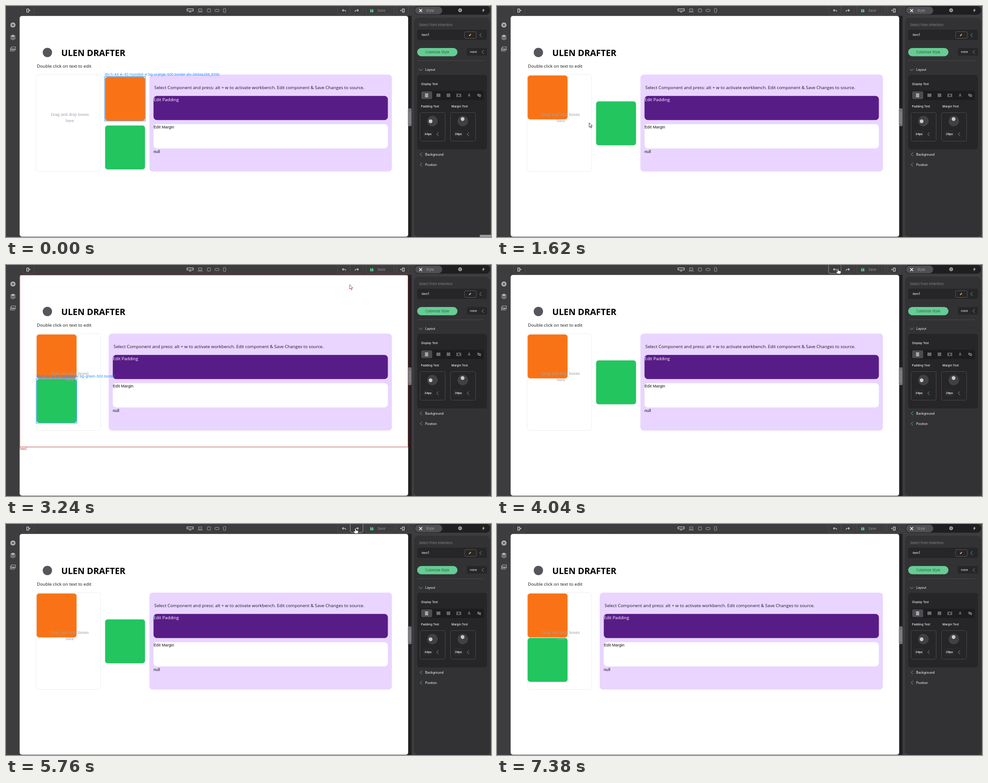
Animation, 1084 px wide and 517 px high, one loop 7680 ms. Source, as an HTML page:

```html
<!DOCTYPE html>
<html lang="en">
<head>
<meta charset="utf-8">
<title>Page builder: drag, undo, redo</title>
<style>
html, body { margin: 0; width: 100%; height: 100%; overflow: hidden; background: #3d3d3f; }
svg { display: block; width: 1084px; height: 517px; }
text { white-space: pre; }
.ui { font-family: Inter, sans-serif; }
.page { font-family: "Open Sans", "Noto Sans", sans-serif; }
.plain { font-family: "Liberation Sans", Arial, sans-serif; }
</style>
</head>
<body>
<svg id="stage" viewBox="0 0 1084 517"></svg>
<script>
const LOOP = 7680;
const ORANGE = '#f97316', GREEN = '#22c55e', BLUE = '#1e90ff', MINT = '#66cc94', RED = '#b5282c';

// Markup helpers
const rect = (x, y, w, h, r, fill, extra = '') =>
  `<rect x="${x}" y="${y}" width="${w}" height="${h}" rx="${r}" fill="${fill}" ${extra}/>`;
const frame = (x, y, w, h, r, color, extra = '') => rect(x, y, w, h, r, 'none', `stroke="${color}" ${extra}`);
const line = (d, color, width = 1) =>
  `<path d="${d}" fill="none" stroke="${color}" stroke-width="${width}" stroke-linejoin="round"/>`;
const shape = (d, fill) => `<path d="${d}" fill="${fill}"/>`;
const circle = (x, y, r, fill) => `<circle cx="${x}" cy="${y}" r="${r}" fill="${fill}"/>`;
const text = (x, y, str, size, fill, font = 'ui', extra = '') =>
  `<text x="${x}" y="${y}" font-size="${size}" fill="${fill}" class="${font}" ${extra}>${str}</text>`;
const group = (id, body) => `<g id="${id}">${body}</g>`;
const chevron = (x, y) => line(`M${x + 2} ${y - 4}l-4.5 4l4.5 4`, MINT, .85);
const box = (fill) => rect(.3, .3, 89.6, 98.6, 6, fill, 'stroke="#e5e7eb" stroke-width=".5"');
const outline = (label, color = BLUE) =>
  frame(-.4, -.4, 90.8, 99.8, 0, color) + text(0, -2.2, label, 7.72, color);
const ghost = (fill) => `<g opacity=".75">${box(fill)}${line('M0 99V0H90', '#5f9fd8', .7)}</g>`;

function toolbar() {
  const button = (x, w, id = '') => frame(x + .5, -4.5, w, 23.5, 4, '#4c4c4f', id && `id="${id}"`);
  const undoArrow = 'M752 9.8H757q2.3 0 2.3 3M754.3 7.3l-2.4 2.5l2.4 2.5';
  return button(36.5, 26) + line('M46.5 6.5h4v7.5h-4z', '#eee', 1.2) + shape('M52 8.2l2.7 1.8l-2.7 1.8z', '#eee') +
    line('M404.5 6.5h14v4.5h-14zM409 13.5h5', '#eee', 1.1) +
    line('M430.5 6.5h7v5h-7zM428.5 13.5h11', '#aaa') +
    frame(450, 6.5, 7, 7, 1, '#aaa') + frame(467, 7.5, 9, 5, 1.5, '#aaa') + frame(486, 5.5, 5, 9, 1.5, '#aaa') +
    button(740.5, 28, 'undo') + button(769, 28.5, 'redo') + line(undoArrow, '#eee', 1.1) +
    `<g transform="matrix(-1 0 0 1 1539.5 0)">${line(undoArrow, '#eee', 1.1)}</g>` +
    button(804, 63) + shape('M814 7h5.5l1.5 1.5v5.5h-7z', MINT) + rect(815.5, 7.5, 3, 2, 0, '#29472f') +
    circle(817.5, 12, 1.1, '#29472f') + text(830, 13, 'Save', 7.6, '#929295') +
    button(872.5, 27) + line('M886 6.5h4v7.5h-4z', '#eee', 1.2) + shape('M881.8 8.2l2.7 1.8l-2.7 1.8z', '#eee');
}

function leftRail() {
  const c = '#b2b2b4';
  return circle(15.5, 42.5, 5.7, c) + line('M12.5 42.5h6M15.5 39.5v6', '#3d3d3f', 1.3) +
    shape('M15.5 64l6 3.2l-6 3.2l-6-3.2z', c) + line('M9.8 70l5.7 3l5.7-3M9.8 72.8l5.7 3l5.7-3', c, 1.2) +
    line('M12 91.5h9v7h-9zM10 93.5v7.5h9.5', c, 1.2) + shape('M13 97.5l2.2-3l1.7 1.8l1.3-1.3l2 2.5z', c);
}

function dialCard(x, ballX, ballY, title, value) {
  return text(x + 2.5, 226.6, title, 6.5, '#eee', 'ui', 'font-weight="500"') +
    frame(x + .5, 238.5, 56, 64, 3, '#4a4a4c') + circle(x + 28, 257.5, 11.8, '#414143') +
    circle(ballX, ballY, 4.2, '#c9c9c9') + frame(x + 8.5, 279.5, 19, 13.5, 2, '#343436') +
    text(x + 10, 289, value, 6.6, '#fff', 'ui', 'font-weight="500"') + chevron(x + 40, 287);
}

function sidePanel() {
  const bars = [0, 3, 6].map(d => `M${963.5 + d} 196v7.5`).join('');
  const grid = [986, 988.8, 991.6].map(x => `M${x} 196v7.5`).join('') + 'M985 197h8M985 199.8h8M985 202.6h8';
  return rect(899, 22, 7.5, 495, 0, '#202022') + rect(898.5, 229, 8, 40, 3, '#707075') +
    [...Array(9)].map((_, i) => line(`M900 ${238 + i * 3}h5`, '#b4b4b8', .6)).join('') +
    rect(913, 0, 169, 19.5, 9.5, '#1f1f21') + rect(914, 1.5, 61, 17, 8.5, '#505054') +
    line('M923.5 7l6.5 6.5M930 7l-6.5 6.5', '#fff', 1.5) + text(939, 13, 'Style', 7.5, '#a3a3a6') +
    circle(1015, 9.5, 4.3, '#a2a2a4') + circle(1015, 9.5, 2, '#68686a') +
    shape('M1068 5l-4 5.5h2.5l-1 4l4.5-6h-2.7z', '#b4b4b6') +
    rect(912, 26, 170, 491, 10, '#323234') +
    text(923, 45.3, 'Select from inheritors', 7.4, '#858588') +
    rect(919, 53, 156, 23, 4, '#262628') + text(929, 67, 'item1', 6.9, '#fff') +
    frame(1025, 57.5, 26, 15, 3, '#5a5a5d') + line('M1035 67l4-4', '#f4ad59', 2) + chevron(1061, 65) +
    rect(919, 94, 90, 18.5, 9.2, MINT) + text(937, 106, 'Cutomize Style', 7.5, '#2b5740') +
    rect(1030, 94, 45, 17, 3, '#262628') + text(1037, 105, 'none', 6.6, '#fff') + chevron(1066, 103) +
    line('M919 122.5H1068', '#49494c') +
    line('M923 140.5l4 4.5l4-4.5', MINT, .85) + text(937, 145.2, 'Layout', 7, '#fff') +
    rect(919, 154, 156, 167, 6, '#262628') +
    text(928, 177.2, 'Display Test', 6.4, '#eee', 'ui', 'font-weight="500"') +
    rect(925, 189.5, 143, 21, 4, '#1d1d1f') + rect(928, 191, 24.5, 17.5, 3, '#4c4c51') +
    line('M936.5 197h7M936.5 200h7M936.5 203h7', '#fff', 1.7) + line(bars, '#aaa', 1.7) + line(grid, '#999') +
    line('M1009.5 197h5v6h-5zM1007.5 196v8M1016.5 196v8', '#999') + text(1032.3, 203.3, 'A', 8.5, '#aaa') +
    line('M1053.5 200q4-4.5 8 0q-4 4.5-8 0M1054 196l7 8', '#aaa', 1.1) +
    dialCard(925, 949, 258, 'Padding Test', '34px') + dialCard(993, 1020.5, 253, 'Margin Test', '39px') +
    chevron(928, 332) + text(937, 334.7, 'Background', 7.2, '#fff') +
    chevron(928, 355) + text(937, 357.5, 'Position', 6.9, '#fff');
}

function page() {
  const prompt = 'Select Component and press: alt + w to activate workbench. Edit component &amp; Save Changes to source.';
  const centred = 'text-anchor="middle"';
  return rect(30.5, 22.3, 868.3, 494, 5, '#fff') +
    circle(92.5, 104, 10.5, '#55555b') +
    text(123.5, 111.8, 'ULEN DRAFTER', 19.4, '#000', 'page', 'font-weight="700"') +
    text(69, 138, 'Double click on text to edit', 9.85, '#111', 'page') +
    frame(67.5, 153.5, 144, 217, 6, '#e3e5ea', 'stroke-dasharray="2 1"') +
    ['panel', 'inner', 'card'].map((id, i) =>
      rect(0, [153.5, 201.2, 264.5][i], 0, [217, 54, 54.3][i], 7.5, ['#e9d5ff', '#581c87', '#fff'][i], `id="${id}"`)).join('') +
    group('words', text(331.5, 185.7, prompt, 9.81, '#1c1522', 'page') + text(329.8, 213, 'Edit Padding', 9.7, '#fff', 'page') +
      text(329.8, 274.3, 'Edit Margin', 9.1, '#111', 'plain') + text(329.8, 328.5, 'null', 9.1, '#111', 'plain')) +
    group('orange', box(ORANGE)) + group('green', box(GREEN)) +
    text(142.7, 246, 'Drag and drop boxes', 9.1, '#9ca3af', 'plain', centred) +
    text(142.7, 259.5, 'here', 9.1, '#9ca3af', 'plain', centred) +
    group('orangeMark', outline('div.h-44 w-40 rounded-xl bg-orange-500 border div-084ea268_935b')) +
    group('greenMark', outline('div.h-44 w-40 rounded-xl bg-green-500 border')) +
    group('htmlMark', line('M30.9 407.3V22.6H898.5V407.3Z', RED, .9) + text(31, 414.3, 'html.', 7.2, RED)) +
    group('dropZone', frame(67, 153.5, 145, 217, 0, '#2fe78d', 'stroke-width="1.5"')) +
    group('insert', line('M97 0h91', '#3a9bf0')) +
    group('orangeGhost', ghost(ORANGE)) + group('greenGhost', ghost(GREEN));
}

function pointers() {
  const edge = 'stroke="#222" stroke-width=".9" stroke-linejoin="round"';
  return group('arrow', `<path d="M0 0V10L2.4 8L4 11.6L5.6 11L4 7.4H7.2Z" fill="#fff" ${edge}/>`) +
    group('copy', frame(6, 10.5, 6.5, 6, 1, '#222', 'style="fill:#fff"') + line('M7.5 13.5h3.5M9.25 11.8v3.5', '#222')) +
    group('hand', `<path d="M-1.2 7V1Q0-1 1.2 1V4.5L5.5 5.5Q6.8 6 6.5 8L5.5 12H-1L-4.3 8Q-4.3 6-2.5 6.5Z" fill="#fff" ${edge}/>`);
}

document.getElementById('stage').innerHTML =
  toolbar() + leftRail() + page() + sidePanel() + group('corner', rect(1059, 512, 25, 5, 0, '#98989a')) + pointers();

const el = id => document.getElementById(id);
const show = (id, on) => el(id).setAttribute('visibility', on ? 'visible' : 'hidden');
const place = (id, x, y) => el(id).setAttribute('transform', `translate(${x} ${y})`);
const during = (t, from, to) => t >= from && t < to;

// The pointer advances in 100 ms steps counted from the start of each move.
const starts = [0, 1010, 1830, 2320, 3140, 5050, 6460, 7280];
const path = [
  [0, 1060, 500], [200, 940, 420], [400, 560, 285], [600, 290, 215], [700, 260, 207], [1009, 260, 207],
  [1010, 230, 207], [1110, 173, 206], [1210, 142, 213], [1410, 132, 220], [1710, 243, 282], [1829, 243, 282],
  [2030, 259, 300], [2130, 261, 302], [2319, 261, 302], [2320, 225, 306], [2420, 147, 319], [2520, 124, 325],
  [2720, 118, 328], [2820, 150, 315], [3020, 440, 205], [3140, 660, 105], [3240, 768, 44], [3340, 774, 22],
  [3840, 762, 8], [5050, 764, 8], [5450, 781, 9.5], [6459, 781, 9.5], [6660, 850, 70], [6960, 1010, 310],
  [7160, 1057, 470], [7279, 1057, 470], [7280, 1059, 503], [LOOP, 1059, 503]
];

function pointerAt(t) {
  const start = starts.filter(s => s <= t).pop();
  const q = start + Math.floor((t - start) / 100) * 100;
  const i = path.findIndex(p => p[0] > q);
  const [t0, x0, y0] = path[i - 1], [t1, x1, y1] = path[i];
  const k = (q - t0) / (t1 - t0);
  return [x0 + (x1 - x0) * k, y0 + (y1 - y0) * k];
}

function render(t) {
  const [x, y] = pointerAt(t);
  const orangeIn = during(t, 1430, 4850) || t >= 5760;
  const greenIn = during(t, 2740, 4040) || t >= 6160;
  const dragOrange = during(t, 1010, 1430), dragGreen = during(t, 2320, 2740);
  const dragging = dragOrange || dragGreen;
  const orangePos = orangeIn ? [68, 155] : [221, 158];
  const greenPos = greenIn ? [68, 254.5] : [221, orangeIn ? 213 : 267];
  const shift = greenIn ? -91 : 0;

  for (const [id, left, right] of [['panel', 320.5, 862.5], ['inner', 329.7, 853.5], ['card', 329.7, 853.5]]) {
    el(id).setAttribute('x', left + shift);
    el(id).setAttribute('width', right - left - shift);
  }
  place('words', shift, 0);
  place('orange', ...orangePos);
  place('green', ...greenPos);
  place('orangeMark', ...orangePos);
  place('greenMark', ...greenPos);
  place('orangeGhost', x - 39, y - 49);
  place('greenGhost', x - 40, y - 89);
  place('insert', 0, dragOrange ? 236.5 : 263.5);

  const overPage = during(t, 3140, 3340);
  show('orangeMark', t < 1430);
  show('greenMark', during(t, 1630, 3340));
  show('htmlMark', overPage);
  show('orangeGhost', dragOrange);
  show('greenGhost', dragGreen);
  show('dropZone', dragging && x < 212);
  show('insert', dragging && x < 212);
  show('corner', t < 100);

  const hand = during(t, 3340, 6460);
  show('arrow', !hand && during(t, 100, 7380));
  show('hand', hand);
  show('copy', dragging);
  for (const id of ['arrow', 'hand', 'copy']) place(id, x, y);
  el('arrow').firstChild.setAttribute('stroke', overPage ? RED : '#222');
  el('undo').setAttribute('stroke', hand && x < 769 ? '#a0a0a3' : '#4c4c4f');
  el('redo').setAttribute('stroke', hand && x >= 769 ? '#a0a0a3' : '#4c4c4f');
}

function tick() {
  render(performance.now() % LOOP);
  requestAnimationFrame(tick);
}
tick();
</script>
</body>
</html>
```
